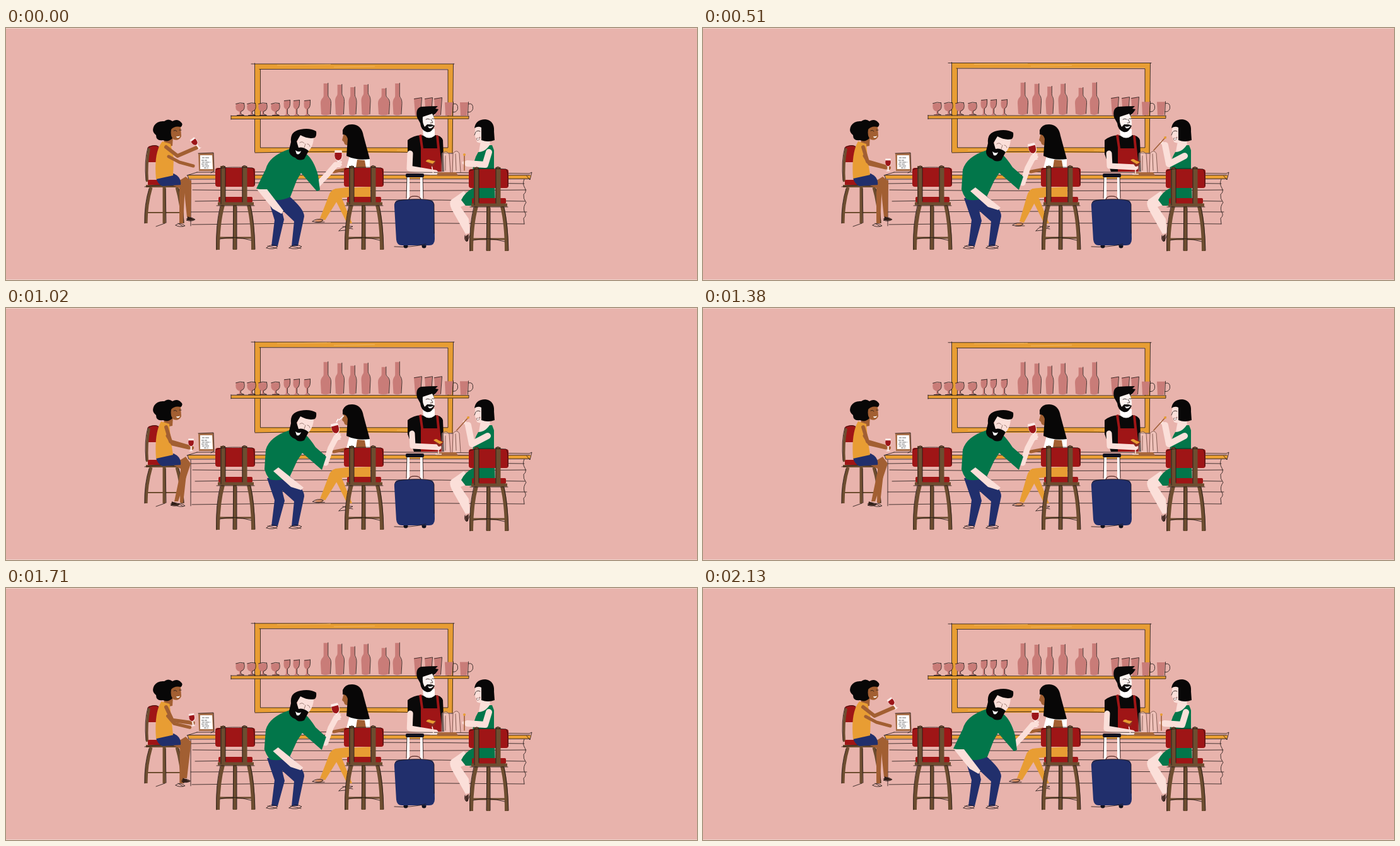
Recreate the animation shown at these times as an HTML page. Size 1096 by 400 pixels, loop 2.16 s.

```html
<!DOCTYPE html>
<html lang="en">
<head>
<meta charset="utf-8">
<title>At the bar</title>
<style>
html, body { margin: 0; width: 100%; height: 100%; overflow: hidden; background: #e8b3ac; }
svg { display: block; width: 1096px; height: 400px; }
.ink { fill: none; stroke: #1c1412; stroke-width: .8; stroke-linecap: round; stroke-linejoin: round; }
.limb { fill: none; stroke-linejoin: round; stroke-linecap: round; }
.wood { fill: none; stroke: #6d4d30; stroke-width: 6; }
.red { fill: #9f1516; }
.navy { fill: #212f6c; }
.green { fill: #02764a; }
.gold { fill: #e89d33; }
.brown { fill: #a25f32; }
.pale { fill: #fbdfd9; }
.white { fill: #fff; }
.rose { fill: #c97c78; }
.s-brown { stroke: #a25f32; }
.s-pale { stroke: #fbdfd9; }
</style>
</head>
<body>
<svg viewBox="0 0 1096 400">
<defs>
  <g id="chair">
    <rect class="red" x="0" y="222" width="63" height="30" rx="4"/>
    <rect class="red" x="5" y="268" width="54" height="9" rx="2"/>
    <path class="wood" style="stroke-width:5" d="M4 279H61"/>
    <path class="wood" style="stroke-width:8" d="M12 219V277M46.500 219V277"/>
    <path class="wood" d="M12 281Q4 310 4 352M53 281Q60 310 60 352M31 281V352"/>
    <path class="wood" style="stroke-width:3" d="M5 333H59"/>
    <path class="ink" d="M1 225Q9 219 59 222Q63 223 62 249M9 279V222Q12 216 16 221V275M43 276V220Q47 216 50 221M2 282H62M8 282Q0 315 2 352M29 283L28 351M34 284V351M56 283Q62 310 63 351M7 335Q29 329 57 337"/>
  </g>
  <g id="wine">
    <path d="M-5.500-9H5.500Q9 5 2 8V16L5 18H-5L-1.500 16V8Q-8 5-5.500-9Z" fill="#fdf0ed" opacity=".9"/>
    <path d="M-5.500-5H5.500Q7 6 0 7Q-7 6-5.500-5Z" fill="#9c1519"/>
  </g>
</defs>

<rect width="1096" height="400" fill="#e8b3ac"/>
<path d="M0 .5H1096M0 399.500H1096" stroke="#f0d3cd"/>

<g id="wall">
  <path d="M399 61H705V194H399Z" fill="none" stroke="#e89d33" stroke-width="8"/>
  <path class="ink" d="M389 57H711M394.500 56V197M395 198Q540 194 708 199M709.500 57L708 199M403.500 66V190L701 190V66L402 65.500"/>
  <path d="M430 59L515 58M520 62L585 61M420 194L470 192M620 194L690 192" stroke="#f0b35c" fill="none"/>
  <rect class="gold" x="357" y="140" width="377" height="4.500"/>
  <path class="ink" d="M357 139.500L734 140M357 144.500L734 144V140M357 139V145"/>
  <g id="shelf"></g>
</g>

<!-- bartender -->
<path d="M637 178Q650 168 664 171L680 170Q690 170 693 178L695 228H647L637 200Z" fill="#0a0909"/>
<path class="white" d="M661 160H680V171Q671 178 662 171Z"/>
<path class="red" d="M655 170L659 169L662 191H684L682 170L686 171L692 228H658V190Z"/>
<path d="M652 142Q649 128 658 125Q671 124 685 124L681 128L686 129Q682 136 678 138L680 155Q675 167 667 165Q658 162 657 151Z" fill="#0a0909"/>
<path d="M661 141L676 136Q681 144 680 155L675 153L668 153L664 157Q660 150 661 141Z" fill="#fdf3f0"/>
<path class="ink" d="M666 145Q669 143 672 145M676 144L679 144M674 145L677 150L673 151"/>
<path d="M669 156Q674 158 678 155Q676 160 671 159Z" fill="#fff"/>
<path class="limb s-pale" stroke-width="9" data-k="bart" d="M641 199L640 223L681 230" data-to="M644 199L645 219L686 221"/>

<!-- counter -->
<path class="gold" d="M289 234L833 234L831 239L290 239Z"/>
<path class="ink" d="M303 229Q560 227 830 231L834 229L831 241L826 235M289 233.500H831M288 234L290 240L831 239.500M303 229L287 234
  M293 241V314M293 247Q555 243 822 247M296 257Q560 260 825 257M300 275Q560 270 823 275M293 292Q560 290 826 292M295 312Q560 308 822 311
  M822 240Q819 247 822 252Q827 260 821 264Q820 271 825 277Q820 283 822 291Q827 297 821 302L822 311"/>
<path d="M685 229H714L717 234H683Z" fill="#a9683d"/>
<path d="M691 199Q697 192 703 199L705 229H690Z M709 198Q714 192 720 199L721 229H708Z" fill="#f6d2c9" opacity=".45"/>
<path class="ink" style="stroke:#6b4038" d="M691 228L692 200Q697 192 703 200L705 229M697 203V226M708 229L709 199Q715 192 719 199L721 229M713 200L714 226M684 234H736"/>
<g data-k="bart" data-from="674 213 -12" data-move="686 213 0">
  <path d="M-7-2H8Q6 7 0 7Z" fill="#8e2b20"/>
  <path class="gold" d="M-8-3Q-4-7 0-3L7 0L2 3Z"/>
  <path d="M0 7V18M-5 19H5" stroke="#fbe6df" stroke-width="1.500"/>
</g>

<!-- menu -->
<path d="M305 199L329 198L330 227H306Z" fill="#a8704a"/>
<path class="white" d="M308 202H327L328 224H308Z"/>
<path d="M311 206H322M310 210H319M311 213H324M310 216H320M311 219H323M314 222H321" stroke="#666" stroke-dasharray="4 1 6 1"/>
<path class="ink" d="M305 199L329 198L330 227L325 230"/>

<!-- left guest -->
<path class="red" d="M226 188Q240 183 243 190L241 213H223Q224 198 226 188Z"/>
<path class="wood" style="stroke-width:4" d="M227 191Q222 215 224 244"/>
<rect class="red" x="225" y="241" width="50" height="9" rx="2"/>
<path class="wood" style="stroke-width:4" d="M222 251H276"/>
<path class="wood" style="stroke-width:5" d="M230 253Q222 280 222 310M251 253V310M271 253Q279 280 280 310"/>
<path class="wood" style="stroke-width:2" d="M223 293H279"/>
<path class="ink" d="M225 190Q234 184 242 188M222 242Q219 210 225 190M220 252Q250 247 277 252M227 255Q219 280 220 310M253 255L254 309M274 255Q281 275 282 309M238 315L252 310"/>
<path class="brown" data-k="leg" d="M262 249L284 246L281 310L275 310L275 254Z" data-to="M264 249L288 247L281 309L276 309L277 255Z"/>
<path class="brown" data-k="leg" d="M264 249L285 236L294 243L293 300L287 300L282 252Z" data-to="M264 249L285 236L293 247L273 307L267 307L278 254Z"/>
<path class="ink" d="M269 313Q276 307 284 314Q275 317 269 313M273 310L281 315"/>
<g data-k="leg" data-from="292 302 0" data-move="267 310 0">
  <path d="M-4-3L8 2Q3 5-5 3Z" fill="#3a251c"/>
  <path class="ink" d="M-6 1Q0-4 8 2Q2 6-6 3L2 0"/>
</g>
<path class="navy" d="M238 238L266 231Q279 237 277 249L248 251Q240 247 238 238Z"/>
<path class="brown" d="M252 171H265L264 187L249 190Z"/>
<path class="gold" data-k="arm" d="M248 180L261 184L266 206L265 234L238 240Q234 197 248 180Z" data-to="M246 180L259 184L261 207L265 233L238 239Q235 199 246 180Z"/>
<g class="limb s-brown" stroke-width="5">
  <path data-k="arm" d="M258 204L275 213L297 219" data-to="M256 203L264 216L290 222"/>
  <path stroke-width="6" data-k="arm" d="M254 189L272 203L302 190" data-to="M254 189L261 212L295 222"/>
</g>
<path d="M251 148Q258 143 264 148Q272 143 278 150Q282 154 276 158Q266 155 262 164L264 175Q257 182 249 178Q238 180 238 170Q230 164 235 155Q240 147 251 148Z" fill="#080707"/>
<path class="brown" d="M262 161Q267 155 277 157L278 172Q274 180 266 177Q260 172 262 161Z"/>
<path d="M270 172Q274 173 276 171Q275 175 271 174Z" fill="#fff"/>
<path class="ink" d="M266 163Q269 161 271 164M275 162H278"/>
<use href="#wine" data-k="arm" data-from="299 181 -37 .75" data-move="293.500 214 0 .75"/>

<!-- woman with long hair -->
<path class="gold" d="M578 252V270H545L531 266L549 310L541 310L520 268L522 255Z"/>
<path class="gold" data-k="foot" d="M550 252L524 255Q515 256 512 266L498 302L506 305L528 270L550 268Z" data-to="M550 252L524 255Q517 256 514 266L502 307L509 309L530 270L550 268Z"/>
<path class="limb s-brown" stroke-width="5" d="M520 228L541 224"/>
<path class="white" d="M540 222L545 203L577 206V222Z"/>
<path class="brown" d="M557 209L569 210L571 222H555Z"/>
<path class="brown" d="M536 167L545 166V185Q537 188 536 181L533 178Z"/>
<path d="M534 162Q538 152 550 153Q564 154 567 171L577 208Q557 211 540 203L542 176Q540 168 534 169Z" fill="#080707"/>
<path class="ink" d="M528 322Q535 312 550 315L538 321L528 322M534 315L550 319"/>
<g data-k="foot" data-from="496 306 0" data-move="501 312 0">
  <path d="M-7 0L5-5L8-1L3 3Z" fill="#d68f65"/>
  <path class="ink" d="M-10 1Q-3-5 7-1Q2 5-10 1M-5 2L9 2"/>
</g>

<use href="#chair" x="332"/>
<use href="#chair" x="536"/>

<!-- bearded guest -->
<path class="navy" data-k="man" d="M415 269L447 265Q473 287 473 299L463 346H453L457 307L437 288L441 304L431 346H421L426 305Z"
  data-to="M414 270L449 266Q474 288 473 299L463 346H453L457 307L438 290L442 306L431 346H421L426 305Z"/>
<path class="ink" d="M413 349Q421 341 431 347Q424 353 413 349M415 346L430 350M449 349Q459 341 469 347Q462 353 449 349M451 346L468 350"/>
<path class="limb s-pale" stroke-width="9" data-k="man" d="M494 249L511 231L523 217" data-to="M507 246L515 222L524 205"/>
<path class="green" data-k="man"
  d="M450 192Q417 203 412 224L397 255L414 258L427 273Q439 274 451 268L461 242L468 230L493 259L498 257L495 234Q488 208 475 199Z"
  data-to="M450 194Q418 204 412 225L410 256L413 264L418 272Q434 276 450 268L462 242L470 230L501 257L508 236L491 221Q482 207 475 201Z"/>
<path class="pale" data-k="man" d="M398 256L414 256L440 290L437 295L423 287Z" data-to="M424 259L432 253L472 285L468 289L452 284Z"/>
<g data-k="man" data-from="0 0 0" data-move="0 2 0">
  <path class="pale" d="M464 171Q476 165 488 175Q487 192 474 200L459 198Z"/>
  <path d="M452 181Q450 164 467 161Q482 158 492 164Q493 171 490 174Q480 177 467 170L461 180L464 190Q471 188 480 195L473 208Q464 212 459 206Q448 202 449 193Z" fill="#080707"/>
  <path d="M459 194Q464 198 468 195Q466 202 461 200Z" fill="#fff"/>
  <path class="ink" style="stroke:#84615a" d="M466 182Q470 179 473 183M478 184Q481 184 482 188M475 184L473 190"/>
</g>
<g data-k="man" data-from="527 203 0" data-move="522.500 192 -14">
  <use href="#wine"/>
  <path class="limb s-pale" stroke-width="4" d="M-5 13L4 10M-4 16L4 14"/>
</g>
<path id="glint" d="M524 181L527 176M528 178L536 171" stroke="#fff" stroke-width="1.500"/>

<!-- suitcase -->
<path d="M638 236V272M659 236V272" stroke="#fff" stroke-width="4"/>
<rect x="634" y="231" width="29" height="6" rx="2" fill="#11131f"/>
<path d="M639 272Q640 267 648 267Q657 267 658 272" fill="none" stroke="#70413c" stroke-width="1.500"/>
<circle cx="634" cy="346" r="3.500" fill="#11131f"/><circle cx="663" cy="346" r="3.500" fill="#11131f"/>
<path class="navy" d="M623 273Q648 270 673 273Q680 274 679 284L680 335Q680 345 671 345H628Q620 345 619 336L616 284Q615 274 623 273Z"/>
<path class="ink" d="M636 236L635 270M661 237L662 270M617 278Q619 272 648 272Q680 270 679 282L679 326M616 347Q640 349 666 343"/>

<!-- guest in green -->
<path class="pale" d="M726 259L706 273Q702 278 707 288L729 327L736 325L734 303L721 284L742 276Z"/>
<path d="M728 331L734 327L733 338Q728 341 728 331Z" fill="#4a3029"/>
<path class="ink" d="M728 329Q726 337 731 339L736 329"/>
<path class="green" d="M743 253L775 250L776 282H729L722 273Q728 260 743 253Z"/>
<path class="pale" d="M754 174L767 177L768 187L774 194L772 222H744L750 196Z"/>
<path class="green" d="M749 197Q760 197 767 186L771 186L774 194L774 250H741Q737 215 749 197Z"/>
<path class="limb s-pale" stroke-width="10" data-k="stir" d="M766 197L760 217L732 215" data-via="M766 198L750 217L725 207" data-to="M764 203L739 216L733 186"/>
<path class="limb s-pale" stroke-width="5" data-k="stir" d="M733 214L726 214" data-via="M726 210L719 203" data-to="M734 188L727 181"/>
<path class="limb" stroke="#a05e37" stroke-width="1.600" data-k="stir" d="M727 201L727 226" data-via="M728 187L722 202" data-to="M734 173L715 194"/>
<circle class="gold" r="2" data-k="stir" data-from="727 201 0" data-mid="728 187 0" data-move="733 174 0"/>
<path class="pale" d="M745 155L761 152L763 179Q755 185 747 181L743 169Z"/>
<path d="M743 159Q745 145 760 145Q775 147 774 164L775 178Q765 182 754 178L754 158Q749 155 743 159Z" fill="#080707"/>
<path class="ink" d="M746 164Q749 162 752 164M745 165L743 170"/>
<path d="M746 175Q750 176 752 173Q751 179 747 178Z" fill="#fff" stroke="#6c3430" stroke-width=".6"/>
<use href="#chair" x="734" y="2"/>
</svg>

<script>
const LOOP = 2160, STEP = 30;
const $ = id => document.getElementById(id);

// each track: pairs of time and pose value
const tracks = {
  arm: [[0, 0], [330, 1], [1620, 1], [1900, 0]],
  leg: [[510, 0], [960, 1], [1500, 1], [1830, 0]],
  man: [[0, 0], [450, 1], [1690, 1], [1920, 0]],
  bart: [[0, 0], [390, 1], [1400, 1], [1760, 0]],
  foot: [[200, 0], [500, 1], [950, 0], [1380, 1], [1740, 0]],
  stir: [[0, 0], [480, 1], [1410, 1], [1710, 0]],
  wall: [[0, 0], [1020, 1], [2100, 0]],
  glint: [[930, 0], [990, 1], [1050, 1], [1110, 0]]
};

function value(keys, t) {
  const i = keys.findIndex(k => k[0] > t);
  if (i < 1) return (i ? keys[keys.length - 1] : keys[0])[1];
  const [t0, a] = keys[i - 1], [t1, b] = keys[i];
  const u = (t - t0) / (t1 - t0);
  return a + (b - a) * u * u * (3 - 2 * u);
}

const NUM = /-?\d*\.?\d+/g;
function mix(a, b, u) {
  const to = b.match(NUM);
  let i = 0;
  return a.replace(NUM, n => +(+n + (to[i++] - n) * u).toFixed(2));
}
const blend = (poses, u) => {
  const pos = u * (poses.length - 1);
  const i = Math.min(Math.floor(pos), poses.length - 2);
  return mix(poses[i], poses[i + 1], pos - i);
};

// shelf
const item = (x, d, line) =>
  `<g transform="translate(${x} 139)"><path class="rose" d="${d}"/><path class="ink" transform="translate(.5 -.5)" d="${line}"/></g>`;
const goblet = x => item(x, "M-6-19H6Q9-8 1-6V-2L6 0H-6L-1-2V-6Q-9-8-6-19Z", "M6-19Q9-8 1-6V-2L6 0H-5M-7-18Q0-21 6-19");
const flute = x => item(x, "M-4-24H5Q6-12 1-10V-2L4 0H-4L-1-2V-10Q-6-12-4-24Z", "M5-24Q6-12 1-10V-2L4 0M-4-23L5-24");
function bottle(x, w, h, neck) {
  const s = neck - h, n = 3.3;
  const right = `M${n} ${-h}V${s}C${n} ${s + 5} ${w} ${s + 4} ${w} ${s + 13}L${w - 1}-2`;
  const body = right + `Q0 1 ${1 - w}-2L${-w} ${s + 13}C${-w} ${s + 4} ${-n} ${s + 5} ${-n} ${s}V${-h}Z`;
  return item(x, body, right);
}
const tumbler = x => item(x, "M-6-27L6-28L4 0H-4Z", "M-6-26L6-28L4-1");
const mug = x => item(x, "M-7-21H6L4 0H-6Z", "M6-18Q14-20 13-10Q11-4 5-5M6-21L5 0");
$("shelf").innerHTML = [
  ...[371, 389, 407, 427].map(goblet),
  ...[445, 460, 477].map(flute),
  bottle(507, 8, 51, 19), bottle(529, 7, 49, 14), bottle(549.5, 6, 45, 12),
  bottle(570.5, 7, 49, 13), bottle(599, 9, 43, 11), bottle(620.5, 7, 51, 19),
  ...[653, 670, 685].map(tumbler), ...[703, 727].map(mug)
].join("");

const parts = [...document.querySelectorAll("[data-k]")].map(el => {
  const s = el.dataset;
  const poses = (s.move ? [s.from, s.mid, s.move] : [el.getAttribute("d"), s.via, s.to]).filter(Boolean);
  return { el, key: s.k, poses, moves: !!s.move };
});

function draw(t) {
  for (const { el, key, poses, moves } of parts) {
    const pose = blend(poses, value(tracks[key], t));
    if (!moves) { el.setAttribute("d", pose); continue; }
    const [x, y, turn, size = 1] = pose.split(" ");
    el.setAttribute("transform", `translate(${x} ${y}) rotate(${turn}) scale(${size})`);
  }
  const rise = 1 + 0.021 * value(tracks.wall, t);
  $("wall").setAttribute("transform", `translate(0 198) scale(1 ${rise}) translate(0 -198)`);
  $("glint").setAttribute("opacity", value(tracks.glint, t));
}

const start = performance.now();
function tick() {
  const t = (performance.now() - start) % LOOP;
  draw(Math.floor(t / STEP) * STEP);
  requestAnimationFrame(tick);
}
tick();
</script>
</body>
</html>
```
